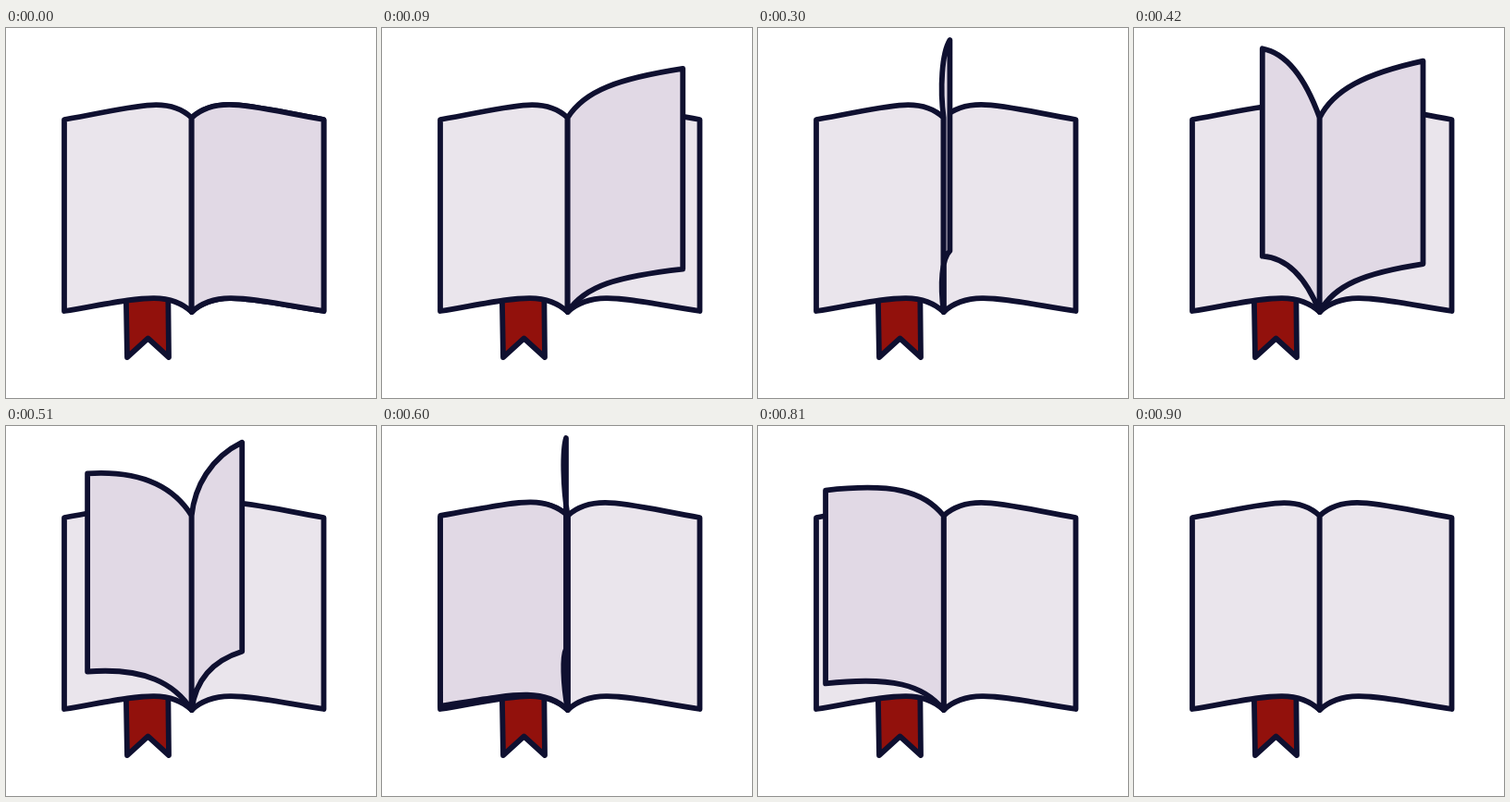
Recreate the animation shown at these times as an HTML page with a canvas. Size 400 by 400 pixels, loop 2930 ms.

```html
<!DOCTYPE html>
<html>
<head>
<meta charset="utf-8">
<style>
  html, body { margin: 0; width: 100%; height: 100%; overflow: hidden; background: #fff; }
  canvas { display: block; }
</style>
</head>
<body>
<canvas id="stage" width="400" height="400"></canvas>
<script>
const ctx = document.getElementById('stage').getContext('2d');
const LOOP = 2930, STEP = 30;
const LIGHT = '#eae5ec', DARK = '#e1d9e5';
const SPINE = { x: 200.7, top: 97, bottom: 307 };
const EDGE = { mid: 203.25, reach: 140.25, top: 99, bottom: 306 };

// A page is visible between from and to; it turns for span ms after start
const turns = [
  { from: 0, to: 630, start: 10, span: 595 },
  { from: 330, to: 900, start: 323, span: 540 }
];

ctx.strokeStyle = '#0f1030';
ctx.lineWidth = 5.8;
ctx.lineJoin = 'round';

function paint(fill) {
  ctx.closePath();
  ctx.fillStyle = fill;
  ctx.fill();
  ctx.stroke();
}

// Control points of the curve from the spine to the page edge
function bend(angle, spineY, edgeX, edgeY) {
  const width = edgeX - SPINE.x, rise = spineY - edgeY;
  const bow = -5 * Math.sin(angle) ** 4;
  return [
    SPINE.x + width * (0.19 - 0.0008 * rise) + bow, spineY - 25 - 0.08 * rise,
    SPINE.x + width * 0.44 + bow, spineY - 13 - rise * (0.68 - 0.15 * Math.cos(angle))
  ];
}

// Angle 0 lies flat on the right, PI flat on the left
function drawPage(angle, fill) {
  const cos = Math.cos(angle), sin = Math.abs(Math.sin(angle));
  const power = 0.85 - 0.25 * cos;
  const x = EDGE.mid + EDGE.reach * cos;
  const top = EDGE.top - 86 * sin ** power;
  const bottom = EDGE.bottom - 65 * sin ** (0.8 * power);
  const [a, b, c, d] = bend(angle, SPINE.bottom, x, bottom);
  ctx.beginPath();
  ctx.moveTo(SPINE.x, SPINE.top);
  ctx.bezierCurveTo(...bend(angle, SPINE.top, x, top), x, top);
  ctx.lineTo(x, bottom);
  ctx.bezierCurveTo(c, d, a, b, SPINE.x, SPINE.bottom);
  paint(fill);
}

function drawBookmark() {
  ctx.beginPath();
  for (const [x, y] of [[129.8, 290], [131, 356], [153.5, 335.5], [176, 356], [175.3, 290]]) ctx.lineTo(x, y);
  paint('#92110c');
}

// The turn slows down while the page stands upright
function turnAngle(t, { start, span }) {
  const u = Math.min(1, Math.max(0, (t - start) / span));
  return Math.PI * (u + 0.04 * Math.sin(2 * Math.PI * u));
}

function draw(t) {
  ctx.clearRect(0, 0, 400, 400);
  drawBookmark();
  drawPage(Math.PI, LIGHT);
  drawPage(0, LIGHT);
  for (const turn of turns) {
    if (t >= turn.from && t < turn.to) drawPage(turnAngle(t, turn), DARK);
  }
}

const begin = performance.now();
function tick() {
  const t = (performance.now() - begin) % LOOP;
  draw(Math.floor(t / STEP) * STEP);
  requestAnimationFrame(tick);
}
tick();
</script>
</body>
</html>
```
